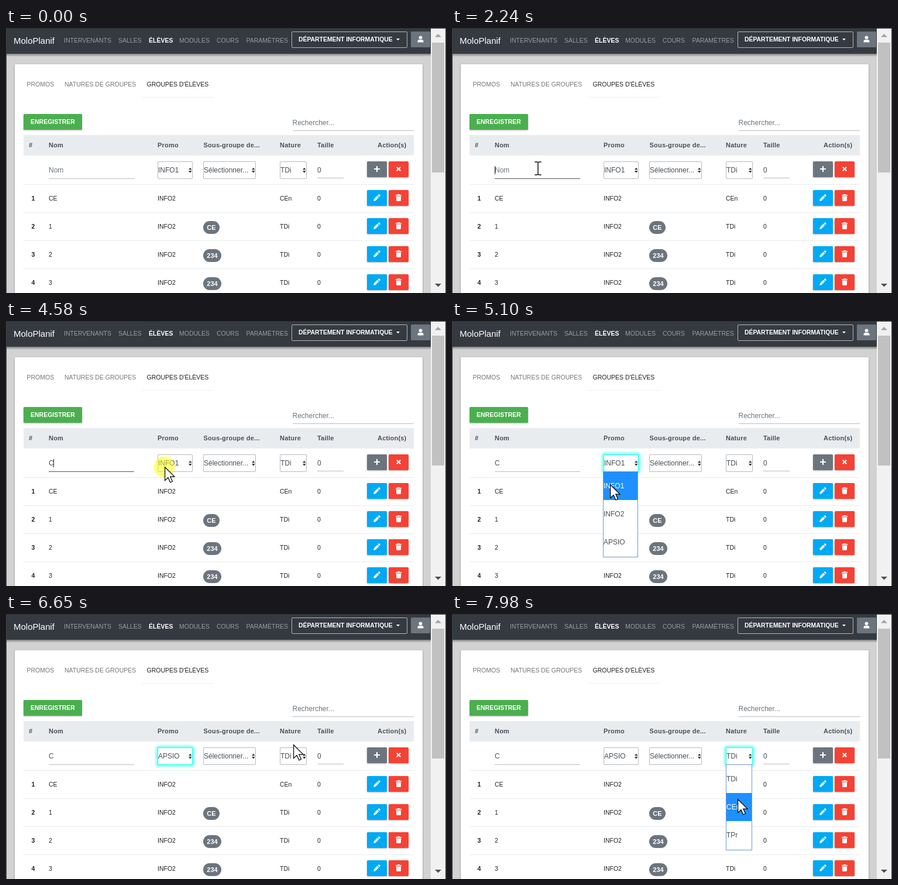
Write an HTML page that moves like this. It is 752x453 px and loops after 8000 ms.

```html
<!DOCTYPE html>
<html lang="fr">
<head>
<meta charset="utf-8">
<title>Groupes d'élèves</title>
<style>
  html, body { margin: 0; width: 100%; height: 100%; overflow: hidden; background: #d2d2d2; }
  svg { display: block; width: 752px; height: 453px; }
  text { font-family: "Liberation Sans", Arial, sans-serif; font-size: 10.5px; white-space: pre; }
</style>
</head>
<body>
<svg id="stage" viewBox="0 0 752 453" xmlns="http://www.w3.org/2000/svg">
  <defs>
    <linearGradient id="navShade" x2="0" y2="1">
      <stop stop-color="#000" stop-opacity=".38"/>
      <stop offset="1" stop-color="#000" stop-opacity="0"/>
    </linearGradient>
    <filter id="cardShadow" x="-5%" y="-5%" width="110%" height="110%">
      <feDropShadow dx="0" dy="1" stdDeviation="1.5" flood-opacity=".35"/>
    </filter>
    <filter id="btnShadow" x="-20%" y="-20%" width="140%" height="150%">
      <feDropShadow dx="0" dy="1" stdDeviation=".9" flood-opacity=".3"/>
    </filter>
    <filter id="glow" x="-20%" y="-30%" width="140%" height="160%">
      <feGaussianBlur stdDeviation="2"/>
    </filter>
  </defs>
</svg>
<script>
const LOOP = 8000;
const ROW = 48;
const SVG = 'http://www.w3.org/2000/svg';
const stage = document.getElementById('stage');

function add(tag, attrs, parent = stage) {
  const el = document.createElementNS(SVG, tag);
  for (const key in attrs) el.setAttribute(key, attrs[key]);
  parent.appendChild(el);
  return el;
}
const group = (attrs = {}, parent = stage) => add('g', attrs, parent);
const rect = (x, y, width, height, fill, more = {}, parent = stage) =>
  add('rect', { x, y, width, height, fill, ...more }, parent);
const path = (d, fill, more = {}, parent = stage) => add('path', { d, fill, ...more }, parent);
function text(x, y, value, fill, more = {}, parent = stage) {
  const el = add('text', { x, y, fill, ...more }, parent);
  el.textContent = value;
  return el;
}
const show = (el, on) => el.setAttribute('visibility', on ? 'visible' : 'hidden');

const BOLD = { 'font-weight': 'bold' };
const INPUT = { style: 'font-size:12px' };
const HEAD = { ...BOLD, style: 'font-size:11px;letter-spacing:.2px' };
const GREY = '#6c757d', DARK = '#495057', INK = '#212121', LINE = '#bdbdbd';

const icons = {
  plus: 'M-5-1.1H-1.1V-5H1.1V-1.1H5V1.1H1.1V5H-1.1V1.1H-5Z',
  cross: 'M-4-2.4L-2.4-4 0-1.6 2.4-4 4-2.4 1.6 0 4 2.4 2.4 4 0 1.6-2.4 4-4 2.4-1.6 0Z',
  pencil: 'M-5.8 5.8l.6-3.3 5.9-5.9 2.7 2.7-5.9 5.9zM1.5-4.2l1.3-1.3q.7-.7 1.4 0l1.3 1.3q.7.7 0 1.4l-1.3 1.3z',
  trash: 'M-5-5H-2l.6-1H1.4L2-5H5V-3.4H-5ZM-4.3-2.6H4.3L3.8 5q-.1 1-1.1 1H-2.7q-1 0-1.1-1Z'
};

function button(x, y, fill, icon) {
  rect(x, y, 34, 27, fill, { rx: 1.5, filter: 'url(#btnShadow)' });
  path(icons[icon], '#fff', { transform: `translate(${x + 17} ${y + 13})` });
}

function select(x, width, value) {
  const glow = rect(x - .5, 227.5, width + 1, 31, 'none',
    { rx: 2, stroke: '#17ffee', 'stroke-width': 3, filter: 'url(#glow)' });
  const box = rect(x + .5, 228.5, width - 1, 29, '#fff', { rx: 1.5 });
  const label = text(x + 1, 247, value, DARK, INPUT);
  path(`M${x + width - 7} 242.3l2.8-3.6 2.8 3.6zm0 1.8h5.6l-2.8 3.6z`, '#343a40');
  return {
    label,
    focus(on) {
      show(glow, on);
      box.setAttribute('stroke', on ? '#17ffee' : '#b5b8bb');
    }
  };
}

function dropdown(x, width, options) {
  const g = group();
  rect(x + .5, 257.5, width - 1, 146, '#fff', { stroke: '#6d97d3' }, g);
  const mark = rect(x + 1, 258, width - 2, ROW, '#1e90ff', {}, g);
  const labels = options.map((o, i) => text(x + 1, 286 + i * ROW, o, DARK, INPUT, g));
  return (open, y) => {
    show(g, open);
    const hover = Math.max(0, Math.min(options.length - 1, Math.floor((y - 258) / ROW)));
    mark.setAttribute('y', 258 + hover * ROW);
    labels.forEach((l, i) => l.setAttribute('fill', i === hover ? '#fff' : DARK));
  };
}

// Page, card and navigation bar
rect(0, 0, 752, 453, '#d2d2d2');
rect(15, 62, 697, 400, '#fff', { rx: 2, filter: 'url(#cardShadow)' });
rect(0, 44, 726, 5, 'url(#navShade)');
rect(0, 0, 726, 44, '#343a40');
text(13, 27, 'MoloPlanif', '#fff', { style: 'font-size:15px' });
[[99, 'INTERVENANTS'], [192, 'SALLES'], [244, 'ÉLÈVES'], [296, 'MODULES'], [360, 'COURS'], [410.5, 'PARAMÈTRES']]
  .forEach(([x, label]) => text(x, 25, label, label === 'ÉLÈVES' ? '#fff' : '#9a9da0',
    label === 'ÉLÈVES' ? BOLD : {}));
rect(488.5, 6.5, 197, 27, 'none', { rx: 1.5, stroke: '#b4b7ba' });
text(500, 23, 'DÉPARTEMENT INFORMATIQUE', '#fff', { ...BOLD, style: 'font-size:10.4px' });
path('M667 18h6l-3 3.2z', '#fff');
rect(692, 6, 33, 27, GREY, { rx: 1.5 });
add('circle', { cx: 708.5, cy: 16.3, r: 2.9, fill: '#fff' });
path('M703.5 24.5v-1.4q0-3.1 3.1-3.1h3.8q3.1 0 3.1 3.1v1.4z', '#fff');

// Scrollbar
rect(726, 0, 26, 453, '#f1f1f1');
rect(728, 25, 21, 222, '#c1c1c1');
path('M733 15.5h11l-5.5-5.5z', '#a3a3a3');
path('M733 437h11l-5.5 5.5z', '#505050');
rect(0, 0, 1, 453, '#3c4246');
rect(751, 0, 1, 453, '#3c4246');
rect(0, 0, 752, 1, '#2b3034');

// Tabs and toolbar
text(35.5, 100, 'PROMOS', '#757575');
text(100, 100, 'NATURES DE GROUPES', '#757575');
text(240.5, 100, "GROUPES D'ÉLÈVES", INK);
rect(232, 118, 124, 1, '#f1f1f1');
rect(30, 147, 100, 27, '#4caf50', { rx: 1.5, filter: 'url(#btnShadow)' });
text(42, 164, 'ENREGISTRER', '#fff', BOLD);
text(489.5, 166, 'Rechercher...', GREY, INPUT);
rect(490, 175, 207, 1, LINE);

// Table
rect(30, 183, 667, 35, '#e9ecef');
[[39, '#'], [73, 'Nom'], [259, 'Promo'], [337.5, 'Sous-groupe de...'], [468, 'Nature'], [532, 'Taille'], [635, 'Action(s)']]
  .forEach(([x, label]) => text(x, 204, label, DARK, HEAD));

[['CE', '', 'CEn'], ['1', 'CE', 'TDi'], ['2', '234', 'TDi'], ['3', '234', 'TDi']].forEach(([name, parent, kind], i) => {
  const top = 267 + i * ROW, base = top + 28;
  rect(30, top, 667, 1, '#e9ebed');
  text(46.5, base, i + 1, INK, { ...BOLD, 'text-anchor': 'middle' });
  text(73, base, name, INK);
  text(259, base, 'INFO2', INK);
  text(468, base, kind, INK);
  text(532, base, '0', INK);
  if (parent) {
    const width = parent.length === 2 ? 28 : 31;
    rect(337, top + 15, width, 22, GREY, { rx: 11 });
    text(337 + width / 2, base + 2, parent, '#fff', { ...BOLD, 'text-anchor': 'middle', style: 'font-size:11px' });
  }
  button(617, top + 10, '#03a9f4', 'pencil');
  button(654, top + 10, '#f44336', 'trash');
});

// Entry row
const nameText = text(73, 247, '', GREY, INPUT);
rect(73, 257, 146, 1, LINE);
const underline = rect(73, 257, 0, 1, '#555');
const caret = rect(73, 236, 1, 14, '#222');
const promo = select(259, 60, 'INFO1');
select(337, 90, 'Sélectionner...').focus(false);
const nature = select(468, 46, 'TDi');
text(532, 247, '0', DARK, INPUT);
rect(532, 256, 45, 1, LINE);
button(617, 228, GREY, 'plus');
button(654, 228, '#f44336', 'cross');
const promoList = dropdown(258, 60, ['INFO1', 'INFO2', 'APSIO']);
const natureList = dropdown(468, 45, ['TDi', 'CEn', 'TPr']);

// Pointer
const halo = add('circle', { r: 18, fill: '#ff0', 'fill-opacity': .5 });
const arrow = path('M.6.8V23.6L6 18.6 9.8 27 13.5 25.3 9.8 17.2H17Z', '#fff',
  { stroke: '#000', 'stroke-width': 1.2 });
const beam = path('M-6-12H-1L0-11 1-12H6V-10H1V10H6V12H1L0 11-1 12H-6V10H-1V-10H-6Z', '#000',
  { stroke: '#fff', 'stroke-width': .6 });

// Each move: first step, last step, number of steps, end point
const moves = [
  [290, 290, 1, 548, 418],
  [365, 440, 2, 208, 267],
  [760, 910, 3, 147, 240],
  [2850, 3170, 5, 312, 225],
  [3490, 3870, 6, 388, 238],
  [4270, 4420, 3, 271, 249],
  [5020, 5420, 6, 269, 363],
  [6110, 6500, 6, 474, 214],
  [6580, 6650, 2, 491, 223],
  [6730, 6890, 3, 497, 244],
  [6970, 6970, 1, 499, 246],
  [7570, 7980, 7, 488, 316]
];
const clicks = [[1150, 1310], [4580, 4720], [5650, 5800], [7200, 7360]];
const blinks = [[1230, 1690], [2240, 2850], [3320, 3870], [4420, 4650]];
const within = (t, spans) => spans.some(([a, b]) => t >= a && t < b);
const smooth = p => p * p * (3 - 2 * p);

function pointerAt(t) {
  let x = 548, y = 418;
  for (const [start, end, steps, toX, toY] of moves) {
    if (t < start) break;
    const gap = steps > 1 ? (end - start) / (steps - 1) : 1;
    const p = smooth(Math.min(steps, Math.floor((t - start) / gap + .01) + 1) / steps);
    x += (toX - x) * p;
    y += (toY - y) * p;
  }
  return [Math.round(x), Math.round(y)];
}

function render(t) {
  const [x, y] = pointerAt(t);
  const visible = t >= 290;
  const overInput = x >= 73 && x < 219 && y >= 228 && y < 258;
  for (const el of [arrow, beam]) el.setAttribute('transform', `translate(${x} ${y})`);
  show(arrow, visible && !overInput);
  show(beam, visible && overInput);
  halo.setAttribute('cx', x - .5);
  halo.setAttribute('cy', y + .5);
  show(halo, within(t, clicks));

  const typed = t >= 2310;
  nameText.textContent = typed ? 'C' : 'Nom';
  nameText.setAttribute('fill', typed ? DARK : GREY);
  caret.setAttribute('x', typed ? 81 : 73);
  show(caret, within(t, blinks));
  const grown = Math.min(1, Math.max(0, Math.floor((t - 1150) / 80) / 4));
  underline.setAttribute('width', t < 4650 ? 146 * (1 - (1 - grown) ** 2) : 0);

  promo.label.textContent = t >= 5730 ? 'APSIO' : 'INFO1';
  promo.focus(t >= 4650 && t < 7280);
  nature.focus(t >= 7280);
  promoList(t >= 4650 && t < 5730, y);
  natureList(t >= 7280, y);
}

const begin = performance.now();
function tick() {
  render((performance.now() - begin) % LOOP);
  requestAnimationFrame(tick);
}
tick();
</script>
</body>
</html>
```
